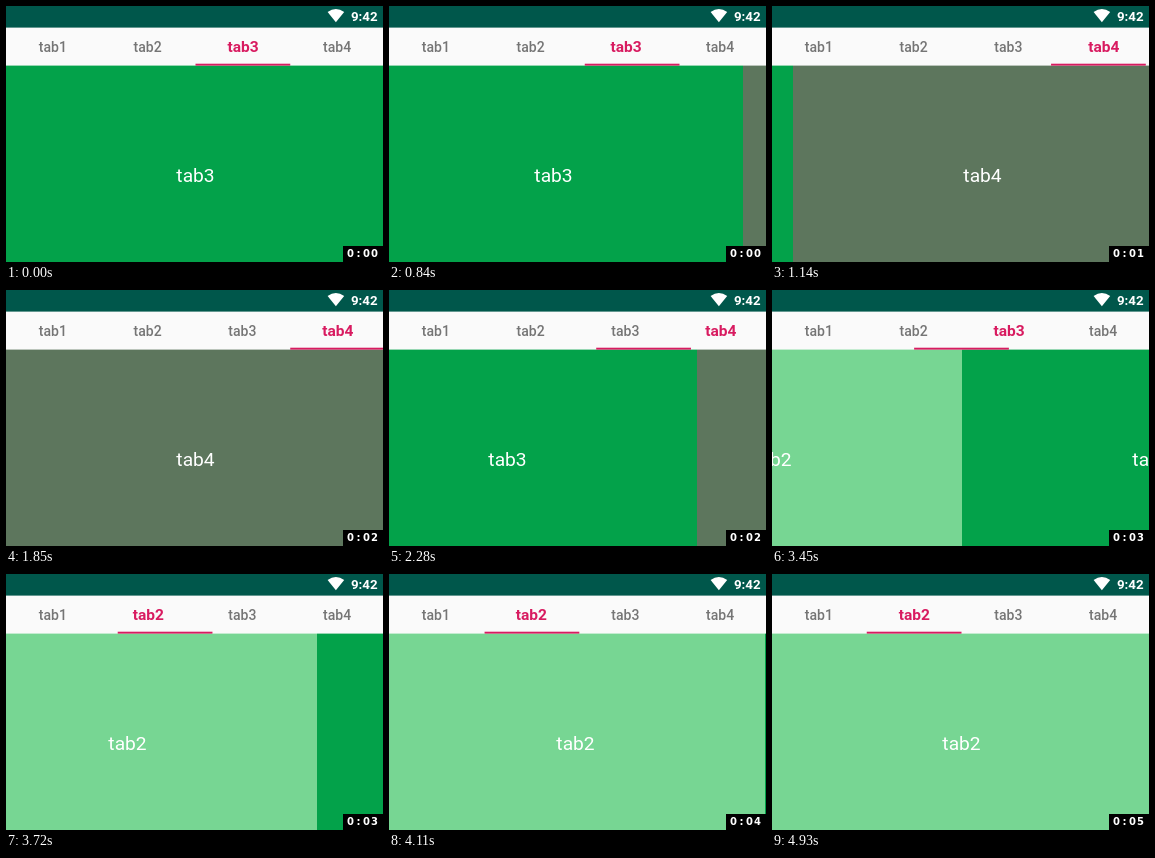
An HTML page with a canvas for the animation above (5.03 s loop, 377 px wide and 256 px high).

```html
<!DOCTYPE html>
<html lang="en">
<head>
<meta charset="utf-8">
<title>Swiping tabs</title>
<style>
  html, body { margin: 0; width: 100%; height: 100%; overflow: hidden; }
  canvas { display: block; }
</style>
</head>
<body>
<canvas id="stage" width="377" height="256"></canvas>
<script>
const HEIGHT = 256, LOOP = 5030;
const SCREEN_WIDTH = 379; // slightly wider than the stage, cropped at the right
const TAB_WIDTH = SCREEN_WIDTH / 4, TABS_TOP = 21.6, PAGE_TOP = 59.6;
const STEP = 140; // ms between screen updates
const ACCENT = '#d81b60';
const PAGE_COLORS = ['#a5e8b8', '#77d693', '#03a24a', '#5d765d'];
const ctx = document.getElementById('stage').getContext('2d');

// A finger drags linearly between two fractions of a page, then the pager settles.
// Durations are in steps.
const swipes = [
  { start: 840, from: 2, to: 3, grab: 0.066, release: 0.446, drag: 1, settle: 2.7 },
  { start: 2130, from: 3, to: 2, grab: 0.38, release: 0.813, drag: 1, settle: 5.3 },
  { start: 3440, from: 2, to: 1, grab: 0.5, release: 0.821, drag: 2, settle: 4.4 }
];

function swipeProgress({ grab, release, drag, settle }, step) {
  if (step < drag) return grab + (release - grab) * step / drag;
  const left = Math.max(0, 1 - (step - drag) / settle);
  return 1 - (1 - release) * left ** 5;
}

function pagerAt(t) {
  const swipe = swipes.findLast(s => s.start <= t);
  if (!swipe) return { position: 2, selected: 2 };
  const step = Math.floor((t - swipe.start) / STEP);
  const { from, to } = swipe;
  return {
    position: from + (to - from) * swipeProgress(swipe, step),
    selected: step < 2 ? from : to
  };
}

function rect(x, y, w, h, color) {
  ctx.fillStyle = color;
  ctx.fillRect(x, y, w, h);
}

function text(str, x, y, font, color) {
  ctx.font = font;
  ctx.textAlign = 'center';
  ctx.fillStyle = color;
  ctx.fillText(str, x, y);
}

function drawPages(position) {
  PAGE_COLORS.forEach((color, i) => {
    const x = Math.round((i - position) * SCREEN_WIDTH);
    rect(x, PAGE_TOP, SCREEN_WIDTH, HEIGHT - PAGE_TOP, color);
    text('tab' + (i + 1), x + SCREEN_WIDTH / 2, 176, '19.2px Roboto, sans-serif', '#fff');
  });
}

function drawTabs({ position, selected }) {
  for (let i = 0; i < 4; i++) {
    const x = (i + 0.5) * TAB_WIDTH, label = 'tab' + (i + 1);
    if (i === selected) text(label, x + 0.2, 46.3, 'bold 15.5px Roboto, sans-serif', ACCENT);
    else text(label, x - 0.5, 45.6, '500 14px Roboto, sans-serif', '#757575');
  }
  rect(position * TAB_WIDTH, 57.7, TAB_WIDTH, 1.9, ACCENT);
}

function drawStatusBar() {
  rect(0, 0, SCREEN_WIDTH, TABS_TOP, '#00574b');
  ctx.fillStyle = '#fff';
  ctx.beginPath();
  ctx.moveTo(329.9, 16.2);
  ctx.lineTo(321.6, 6);
  ctx.quadraticCurveTo(329.9, -0.2, 338.2, 6);
  ctx.fill();
  text('9:42', 358.2, 15, '600 13.3px Roboto, sans-serif', '#fff');
}

function drawTimer(seconds) {
  rect(337, 240, 40, 16, '#000');
  [...'0:0' + seconds].forEach((char, i) =>
    text(char, 344.5 + i * 8, 251, 'bold 10px "DejaVu Sans", sans-serif', '#fff'));
}

function draw(now) {
  const t = now % LOOP;
  const pager = pagerAt(t);
  rect(0, 0, SCREEN_WIDTH, HEIGHT, '#fafafa');
  drawPages(pager.position);
  drawTabs(pager);
  drawStatusBar();
  drawTimer(Math.floor((t + 150) / 1000));
  requestAnimationFrame(draw);
}

draw(0);
</script>
</body>
</html>
```
